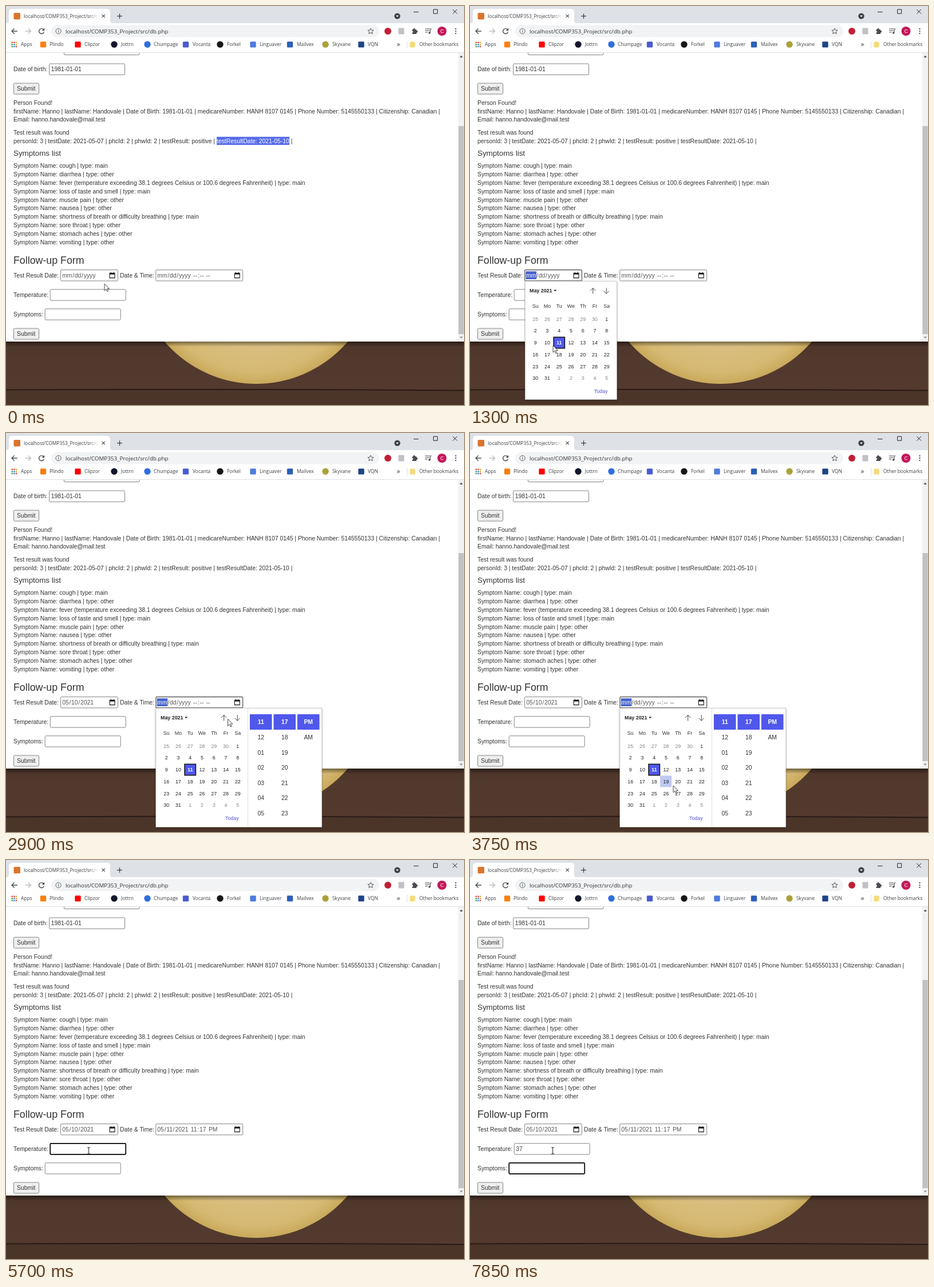
Recreate the animation shown at these times as an HTML page. Size 800 by 698 pixels, loop 8000 ms.

```html
<!DOCTYPE html>
<html lang="en">
<head>
<meta charset="utf-8">
<title>Follow-up form</title>
<style>
  html, body { margin: 0; width: 100%; height: 100%; overflow: hidden; }
  svg { display: block; width: 100%; height: 100%; }
  text { white-space: pre; font-family: "Liberation Sans", Arial, sans-serif; }
  .ui { font-family: "Open Sans", "Noto Sans", sans-serif; }
  .picker { filter: drop-shadow(0 1px 1.5px rgba(0, 0, 0, .4)); }
</style>
</head>
<body>
<svg viewBox="0 0 800 698">
  <defs>
    <radialGradient id="moon" gradientUnits="userSpaceOnUse" cx="437" cy="451" r="210">
      <stop offset=".7" stop-color="#d9be80"/><stop offset=".9" stop-color="#d5b972"/><stop offset="1" stop-color="#c9a95b"/>
    </radialGradient>
    <linearGradient id="wood" x2="0" y2="1">
      <stop offset="0" stop-color="#4a3329"/><stop offset=".35" stop-color="#51392d"/><stop offset="1" stop-color="#543a2e"/>
    </linearGradient>
    <linearGradient id="shade" x2="0" y2="1">
      <stop offset="0" stop-opacity=".45"/><stop offset="1" stop-opacity="0"/>
    </linearGradient>
    <linearGradient id="tabFade">
      <stop offset="0" stop-color="#fff" stop-opacity="0"/><stop offset="1" stop-color="#fff"/>
    </linearGradient>
    <pattern id="hatch" width="2" height="2" patternUnits="userSpaceOnUse">
      <path d="M0 0h2v2h-2z" fill="#c9d1f6"/><path d="M0 0h1v1h-1zM1 1h1v1h-1z" fill="#b4c0f0"/>
    </pattern>
  </defs>
  <g id="scene"></g>
  <g id="live"></g>
</svg>
<script>
const LOOP = 8000, BODY = 10.38, SMALL = 8.9, UI = 8.4;
const BLUE = '#5058ec', MARK = '#4862cc';

const text = (x, y, s, size = BODY, fill = '#333', extra = '') =>
  `<text x="${x}" y="${y}" font-size="${size}" fill="${fill}" ${extra}>${s}</text>`;
const ui = (x, y, s, size = UI, fill = '#3c4043') => text(x, y, s, size, fill, 'class="ui"');
const mid = (x, y, s, size, fill, bold) =>
  text(x, y, s, size, fill, `text-anchor="middle"${bold ? ' font-weight="bold"' : ''}`);
const rect = (x, y, w, h, fill, extra = '') =>
  `<rect x="${x}" y="${y}" width="${w}" height="${h}" fill="${fill}" ${extra}/>`;
const disc = (x, y, r, fill, extra = '') => `<circle cx="${x}" cy="${y}" r="${r}" fill="${fill}" ${extra}/>`;
const line = (d, stroke = '#4a4d51', width = 1.2, fill = 'none') =>
  `<path d="${d}" stroke="${stroke}" stroke-width="${width}" fill="${fill}"/>`;
const fill = (d, color = '#4a4d51') => `<path d="${d}" fill="${color}"/>`;

// ---------- still parts ----------
function desktop() {
  return rect(0, 580, 800, 92, 'url(#wood)') + rect(0, 672, 800, 26, '#4b3529') +
    disc(437, 451, 210, 'url(#moon)') +
    line('M0 671.5Q400 669.5 800 672.5', '#281914', 2) +
    rect(0, 587, 800, 9, 'url(#shade)');
}

const symptoms = [
  'cough | type: main', 'diarrhea | type: other',
  'fever (temperature exceeding 38.1 degrees Celsius or 100.6 degrees Fahrenheit) | type: main',
  'loss of taste and smell | type: main', 'muscle pain | type: other', 'nausea | type: other',
  'shortness of breath or difficulty breathing | type: main', 'sore throat | type: other',
  'stomach aches | type: other', 'vomiting | type: other'];

const box = (x, y, w, stroke = '#767676', width = .9) =>
  rect(x, y, w, 19.3, '#fff', `rx="1.5" stroke="${stroke}" stroke-width="${width}"`);
const submit = y =>
  rect(13.4, y, 44.2, 19, '#efefef', 'rx="2" stroke="#767676" stroke-width=".9"') + text(19, y + 13.2, 'Submit');

function page() {
  const rows = [
    [114.4, 'Date of birth:'], [172.5, 'Person Found!'],
    [187.5, 'firstName: Hanno | lastName: Handovale | Date of Birth: 1981-01-01 | medicareNumber: HANH 8107 0145 | Phone Number: 5145550133 | Citizenship: Canadian |'],
    [202.3, 'Email: hanno.handovale@mail.test'], [224.5, 'Test result was found'],
    [239.5, 'personId: 3 | testDate: 2021-05-07 | phcId: 2 | phwId: 2 | testResult: positive | testResultDate: 2021-05-10 |'],
    ...symptoms.map((s, i) => [283.2 + i * 14.83, 'Symptom Name: ' + s]),
    [475, 'Test Result Date:'], [509.2, 'Temperature:'], [543.2, 'Symptoms:']];
  return rect(0, 80, 800, 507, '#fff') + rows.map(([y, s]) => text(13, y, s)).join('') +
    text(199, 475, 'Date &amp; Time:') +
    text(13, 261.8, 'Symptoms list', 13.35) + text(13, 450.8, 'Follow-up Form', 17.8) +
    box(101.5, 66.2, 131.5) + box(75.5, 101, 132) + text(78.7, 114.4, '1981-01-01') +
    submit(135.1) + submit(564) +
    rect(790, 82, 10, 505, '#f1f1f1') + rect(790.4, 210, 9.2, 364, '#c1c1c1') +
    fill('M792.5 90l2.7-3.4 2.7 3.4z', '#505050') + fill('M792.5 578.6l2.7 3 2.7-3z', '#8a8a8a');
}

const bookmarks = [
  [65, 76, '#f98012', 'Plindo', 0], [125.5, 137, '#f00', 'Clipzor', 0], [189, 201, '#14182b', 'Jottrn', 1],
  [247, 258, '#2f6fe0', 'Chumpage', 1], [314, 326, '#4b5bd0', 'Vocanta', 0], [374, 386, '#181717', 'Forkel', 1],
  [431.5, 443, '#4c7be0', 'Linguaver', 0], [496, 508, '#2b5fb8', 'Mailvex', 0],
  [558, 570, '#a9a23a', 'Skyvane', 1], [620.5, 632, '#1c4488', 'VQN', 0]];

function browser() {
  let s = rect(0, 0, 800, 31, '#dee1e6') + rect(0, 30, 800, 51, '#fff') + rect(0, 81, 800, .8, '#d5d7da');
  // tab strip and window buttons
  s += fill('M0 30.5Q5 30.5 5 25V11Q5 5 11 5H176Q182 5 182 11V25Q182 30.5 187 30.5z', '#fff') +
    rect(13.5, 12, 11.5, 11.5, '#d9762c', 'rx="1.5"') +
    ui(31, 20.8, 'localhost/COMP353_Project/src/d') + rect(146, 10, 15, 15, 'url(#tabFade)') +
    rect(161, 10, 5, 15, '#fff') +
    line('M167.5 14.8l5.4 5.4m0-5.4l-5.4 5.4') + line('M194 17.7h9m-4.5-4.5v9', '#3c4043', 1.3) +
    disc(683.5, 17.6, 5.2, '#3c4043') + fill('M681 16.4h5l-2.5 3z', '#fff') +
    line('M712 10.5h8.5M746.7 6h7v7.2h-7zM780.5 6l7.4 7.4m0-7.4l-7.4 7.4', '#222', 1);
  // toolbar
  s += rect(79, 33.5, 573, 21, '#f1f3f4', 'rx="10.5"') +
    line('M19.8 44H10.4M14.6 39.4L10 44l4.6 4.6', '#4a4d51', 1.4) +
    line('M33.5 44H43M38.8 39.4l4.6 4.6-4.6 4.6', '#bcbec1', 1.4) +
    line('M65.6 41.3A4.5 4.5 0 1 0 66.4 45.4', '#4a4d51', 1.4) + fill('M67.2 38.6v4.6h-4.6z') +
    disc(91.6, 44, 4.6, 'none', 'stroke="#5f6368"') + line('M91.6 43.3v3.2M91.6 41.2v1.2', '#5f6368', 1.1) +
    ui(104, 47.7, 'localhost/COMP353_Project/src/db.php', 9.83, '#303336') +
    line('M637 39l1.5 3.3 3.6.3-2.7 2.4.8 3.5-3.2-1.9-3.2 1.9.8-3.5-2.7-2.4 3.6-.3z', '#55585c', 1) +
    disc(667, 44, 6, '#c21f33') + rect(685.5, 38.5, 10, 11, '#bfc1c4', 'rx="1"') +
    rect(709.5, 41, 7.6, 8, '#4a4d51', 'rx="1"') + disc(713, 40.8, 1.8, '#4a4d51') + disc(717.4, 44.8, 1.8, '#4a4d51') +
    disc(709.6, 45.2, 1.4, '#fff') +
    line('M732 40h7.5M732 43h7.5M732 46h4.5M741 47v-7h2.5', '#4a4d51', 1.2) + disc(739.6, 47, 1.7, '#4a4d51') +
    disc(761.5, 44, 8, '#c2185b') + mid(761.5, 47, 'C', 8.5, '#fff') +
    [40, 44, 48].map(y => disc(785.5, y, 1.15, '#4a4d51')).join('');
  // bookmarks bar
  const dots = ['#d9483b', '#d9483b', '#e0a62c', '#3f9a55', '#4678d8', '#e0a62c', '#3f9a55', '#4678d8', '#d9483b'];
  s += dots.map((c, i) => rect(9.6 + i % 3 * 3.6, 62.6 + (i / 3 | 0) * 3.6, 2.4, 2.4, c)).join('') + ui(26, 70.3, 'Apps');
  for (const [x, tx, color, name, round] of bookmarks)
    s += (round ? disc(x, 67.3, 5.7, color) : rect(x - 5.2, 62.2, 10.4, 10.4, color, 'rx="1.5"')) + ui(tx, 70.3, name);
  return s + ui(682.5, 70.6, '»', 12) + line('M700.5 61v13', '#d5d7da', .8) +
    rect(705.5, 62.5, 9, 10, '#f6da78', 'rx="1"') + ui(722, 70.3, 'Other bookmarks', 8.3);
}

// ---------- moving parts ----------
const OPEN_DATE = 500, PICK_DATE = 1800, OPEN_TIME = 2600, PICK_TIME = 4050,
  FOCUS_TEMP = 4950, TYPE_3 = 6350, TYPE_7 = 6600, FOCUS_SYMPTOMS = 7150;
const within = (t, from, to) => t >= from && t < to;

const path = [
  [0, 172, 486], [400, 186, 471], [800, 186, 472], [1200, 160, 590], [1300, 145, 594], [1650, 136, 588],
  [1850, 136, 588], [2200, 386, 471], [2450, 403, 471], [2750, 403, 472], [3250, 332, 602], [3600, 345, 608],
  [3750, 355, 617], [4000, 322, 589], [4150, 322, 589], [4550, 157, 537], [4850, 144.5, 508.5], [LOOP, 144.5, 508.5]];

function pointerAt(t) {
  const i = Math.max(1, path.findIndex(p => p[0] > t));
  const [t0, x0, y0] = path[i - 1], [t1, x1, y1] = path[i];
  let k = Math.max(0, (t - t0) / (t1 - t0));
  k = k * k * (3 - 2 * k);
  return [x0 + (x1 - x0) * k, y0 + (y1 - y0) * k];
}

function pointer(t) {
  const [x, y] = pointerAt(t);
  const overField = t > 4300 && (within(x, 68, 200) && within(y, 529, 549) || within(x, 77, 209) && within(y, 495, 515));
  return overField
    ? line(`M${x} ${y}m-2.5-5.5h5m-2.5 0v11m-2.5 0h5`, '#222', 1)
    : line(`M${x} ${y}v12l2.8-2.6 2 4.3 1.9-.9-2-4.1 3.8-.2z`, '#333', .9, '#fff');
}

// Date inputs pad every segment a little.
function dateField(x, w, value, opened, focused) {
  const active = opened || focused, y = 461.6;
  const parts = value.match(/\w+|--|./g);
  const spans = parts.map((p, i) => `<tspan dx=".74"${active && !i ? ' fill="#fff"' : ''}>${p}</tspan>`).join('');
  const cx = x + w - 14.2;
  return box(x, y, w, focused ? '#000' : opened ? '#444' : '#767676', focused ? 1.7 : opened ? 1.1 : .9) +
    (active ? rect(x + 1.7, 464.2, parts[0] === 'mm' ? 18.8 : 13, 13.8, MARK) : '') +
    text(x + 1.8, 475, spans, BODY, '#555') +
    line(`M${cx} 467.4h8.8v8.2h-8.8z`, '#111', 1.1) + rect(cx, 467, 8.8, 2.6, '#111') +
    line(`M${cx + 2} 465.8v2m4.8-2v2`, '#111', 1.1);
}

function textField(x, y, value, focusStart, focusEnd, t, lastKey = focusStart) {
  const focused = within(t, focusStart, focusEnd);
  const caret = focused && (t - lastKey) % 1000 < 500;
  const cx = x + 3.2 + value.length * 5.77;
  return box(x, y, 132, focused ? '#000' : '#767676', focused ? 1.7 : .9) +
    text(x + 3, y + 13.4, value, BODY, '#444') + (caret ? rect(cx, y + 3.8, .8, 12, '#222') : '');
}

function calendar(x, t, ringed) {
  const step = 20.75, [hx, hy] = pointerAt(t - 100);
  const cx = i => x + 18 + i % 7 * step, cy = i => 546.5 + (i / 7 | 0) * step;
  let s = text(x + 7.8, 501, 'May 2021', SMALL, '#222', 'font-weight="bold"') +
    fill(`M${x + 50} 496.5h5l-2.5 3z`, '#222') +
    line(`M${x + 118.5} 503.5v-10m-4.6 4.6l4.6-4.6 4.6 4.6M${x + 142} 493v10.3m-4.6-4.6l4.6 4.6 4.6-4.6`, '#444', 1);
  s += ['Su', 'Mo', 'Tu', 'We', 'Th', 'Fr', 'Sa'].map((d, i) => mid(cx(i), 528.2, d, SMALL, '#333')).join('');
  for (let i = 0; i < 42; i++) {
    const n = i - 5, inMonth = n > 0 && n < 32, chosen = n === 11;
    const left = cx(i) - step / 2, top = cy(i) - step / 2 + 1;
    if (chosen) s += rect(left + .7, top + .7, 19.4, 19.4, BLUE, ringed ? 'stroke="#111" stroke-width="1.5"' : '');
    else if (within(hx, left, left + step) && within(hy, top, top + step)) s += rect(left, top, 20, 20, 'url(#hatch)');
    s += mid(cx(i), cy(i) + 4.2, n < 1 ? n + 30 : n > 31 ? n - 31 : n, SMALL,
      chosen ? '#fff' : inMonth ? '#222' : '#858585', chosen);
  }
  return s + text(x + 120.8, 676.6, 'Today', SMALL, '#5058d0');
}

const panel = (x, w, h) => rect(x, 481.3, w, h, '#fff', 'class="picker" stroke="#bbb" stroke-width=".6"');

function clock() {
  const columns = [['11', '12', '01', '02', '03', '04', '05'], ['17', '18', '19', '20', '21', '22', '23'], ['PM', 'AM']];
  return line('M422.3 482v207', '#ddd', .9) + columns.map((column, c) => {
    const x = 445.2 + c * 41.5;
    return rect(x - 19.3, 492, 38.6, 27, BLUE, 'rx="1"') +
      column.map((s, i) => mid(x, 509.2 + i * 26.65, s, BODY, i ? '#333' : '#fff', !i)).join('');
  }).join('');
}

function live(t) {
  const dateOpen = within(t, OPEN_DATE, PICK_DATE), timeOpen = within(t, OPEN_TIME, FOCUS_TEMP);
  const temperature = t < TYPE_3 ? '' : t < TYPE_7 ? '3' : '37';
  const lastKey = t < TYPE_3 ? FOCUS_TEMP : t < TYPE_7 ? TYPE_3 : TYPE_7;
  let s = '';
  if (t < OPEN_DATE) s += rect(368, 228.8, 127, 14.2, '#566cea') + text(368, 239.5, 'testResultDate: 2021-05-10', BODY, '#fff');
  s += dateField(95.6, 99.8, t < PICK_DATE ? 'mm/dd/yyyy' : '05/10/2021', dateOpen, within(t, PICK_DATE, OPEN_TIME)) +
    dateField(261.8, 151.8, t < PICK_TIME ? 'mm/dd/yyyy --:-- --' : '05/11/2021 11:17 PM', timeOpen, false) +
    textField(77.2, 495.8, temperature, FOCUS_TEMP, FOCUS_SYMPTOMS, t, lastKey) +
    textField(68.2, 529.8, '', FOCUS_SYMPTOMS, LOOP, t);
  if (dateOpen) s += panel(96.2, 160.3, 207.2) + calendar(96.2, t, true);
  if (timeOpen) s += panel(261.8, 290, 208.2) + calendar(262.2, t, t < PICK_TIME) + clock();
  return s + pointer(t);
}

const layer = document.getElementById('live');
document.getElementById('scene').innerHTML = desktop() + page() + browser();
const start = performance.now();
function frame() {
  layer.innerHTML = live((performance.now() - start) % LOOP);
  requestAnimationFrame(frame);
}
frame();
</script>
</body>
</html>
```
